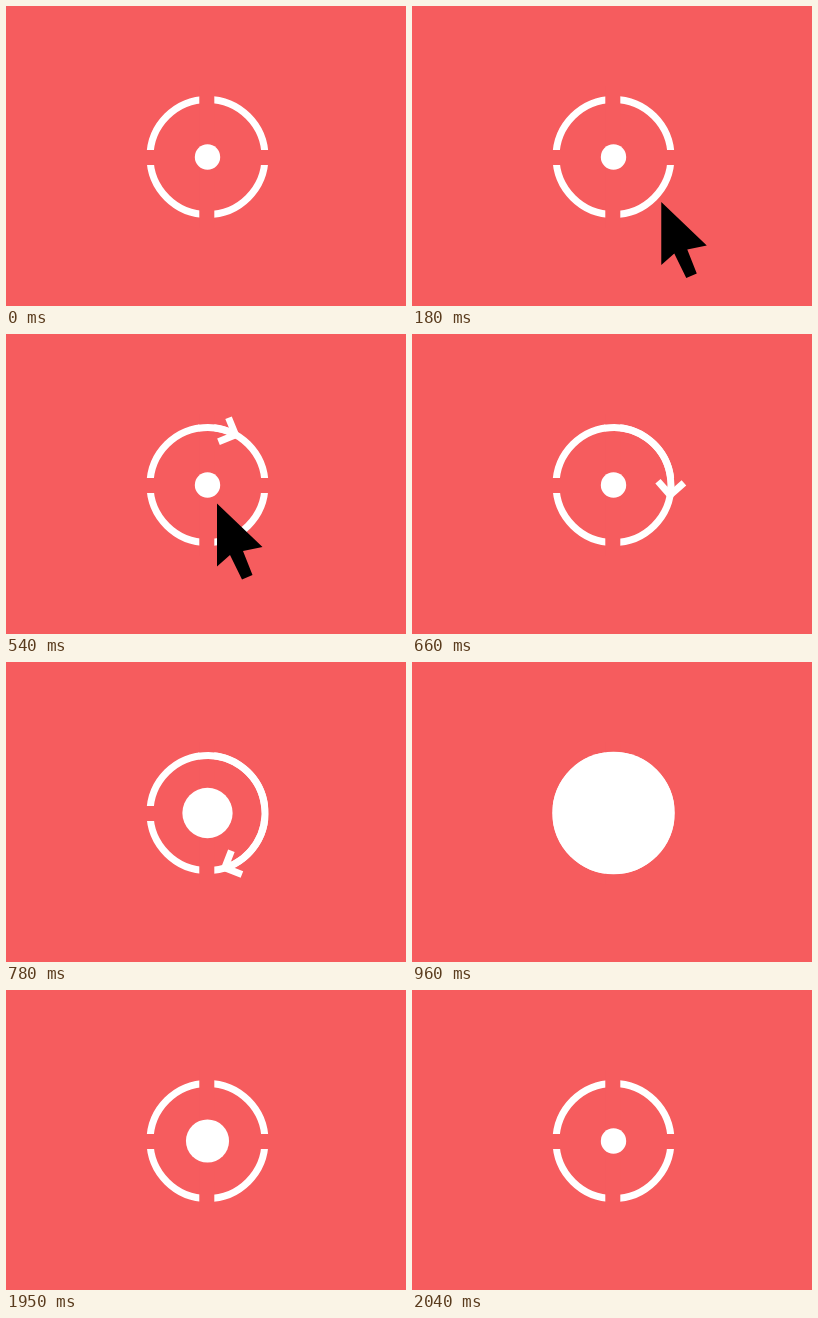
Animation, 400 px wide and 300 px high, one loop 2760 ms. Source, as an HTML page with a canvas:

```html
<!DOCTYPE html>
<html lang="en">
<head>
<meta charset="utf-8">
<title>Target</title>
<style>
html, body { margin: 0; width: 100%; height: 100%; overflow: hidden; background: #f65c5e; }
canvas { display: block; }
</style>
</head>
<body>
<canvas id="stage" width="400" height="300"></canvas>
<script>
const ctx = document.getElementById('stage').getContext('2d');
const LOOP = 2760, STEP = 30;
const RED = '#f65c5e', WHITE = '#fff';
const CX = 201.5, CY = 151, RADIUS = 57.5, STROKE = 7, GAP = 15;
const DOT_SMALL = 12.7, DOT_LARGE = 61.3;
const CURSOR = [[0, 0], [0, 63], [13, 51.5], [25, 76], [35.5, 71.5], [26, 47.5], [45.5, 43.5]];

const progress = (t, start, end) => Math.min(1, Math.max(0, (t - start) / (end - start)));
const easeInOut = (u, power) =>
  u < 0.5 ? (2 * u) ** power / 2 : 1 - (2 - 2 * u) ** power / 2;
const radians = degrees => degrees * Math.PI / 180;

function circle(radius) {
  ctx.beginPath();
  ctx.arc(CX, CY, radius, 0, 2 * Math.PI);
}

function drawRing() {
  circle(RADIUS);
  ctx.stroke();
  ctx.fillStyle = RED;
  ctx.fillRect(CX - 0.7 - GAP / 2, 80, GAP, 142);
  ctx.fillRect(130, CY + 0.5 - GAP / 2, 143, GAP);
}

// Angles run clockwise from the top of the ring.
function drawArrow(t) {
  if (t < 390 || t >= 930) return;
  const angle = -8 + 196 * easeInOut(progress(t, 371, 920), 2);
  ctx.beginPath();
  ctx.arc(CX, CY, RADIUS, radians(-99), radians(angle - 90));
  ctx.stroke();

  ctx.save();
  ctx.translate(CX, CY);
  ctx.rotate(radians(angle));
  ctx.translate(0, -RADIUS);
  ctx.rotate(radians(-6.4));
  ctx.beginPath();
  ctx.moveTo(-13, -13);
  ctx.lineTo(0, 0);
  ctx.lineTo(-13, 13);
  ctx.stroke();
  ctx.restore();
}

function drawDot(t) {
  const grow = easeInOut(progress(t, 660, 960), 3);
  const shrink = easeInOut(progress(t, 1770, 2050), 3);
  circle(DOT_SMALL + (DOT_LARGE - DOT_SMALL) * (grow - shrink));
  ctx.fillStyle = WHITE;
  ctx.fill();
}

function drawCursor(t) {
  if (t < 90 || t >= 660) return;
  const away = (1 - progress(t, 60, 350)) ** 3;
  ctx.save();
  ctx.translate(211 + 190 * away, 169.5 + 131 * away);
  ctx.beginPath();
  CURSOR.forEach(([x, y]) => ctx.lineTo(x, y));
  ctx.closePath();
  ctx.fillStyle = '#000';
  ctx.fill();
  ctx.restore();
}

function draw() {
  const t = Math.floor(performance.now() % LOOP / STEP) * STEP;
  ctx.fillStyle = RED;
  ctx.fillRect(0, 0, 400, 300);
  ctx.strokeStyle = WHITE;
  ctx.lineWidth = STROKE;
  drawRing();
  drawArrow(t);
  drawDot(t);
  drawCursor(t);
  requestAnimationFrame(draw);
}
draw();
</script>
</body>
</html>
```
